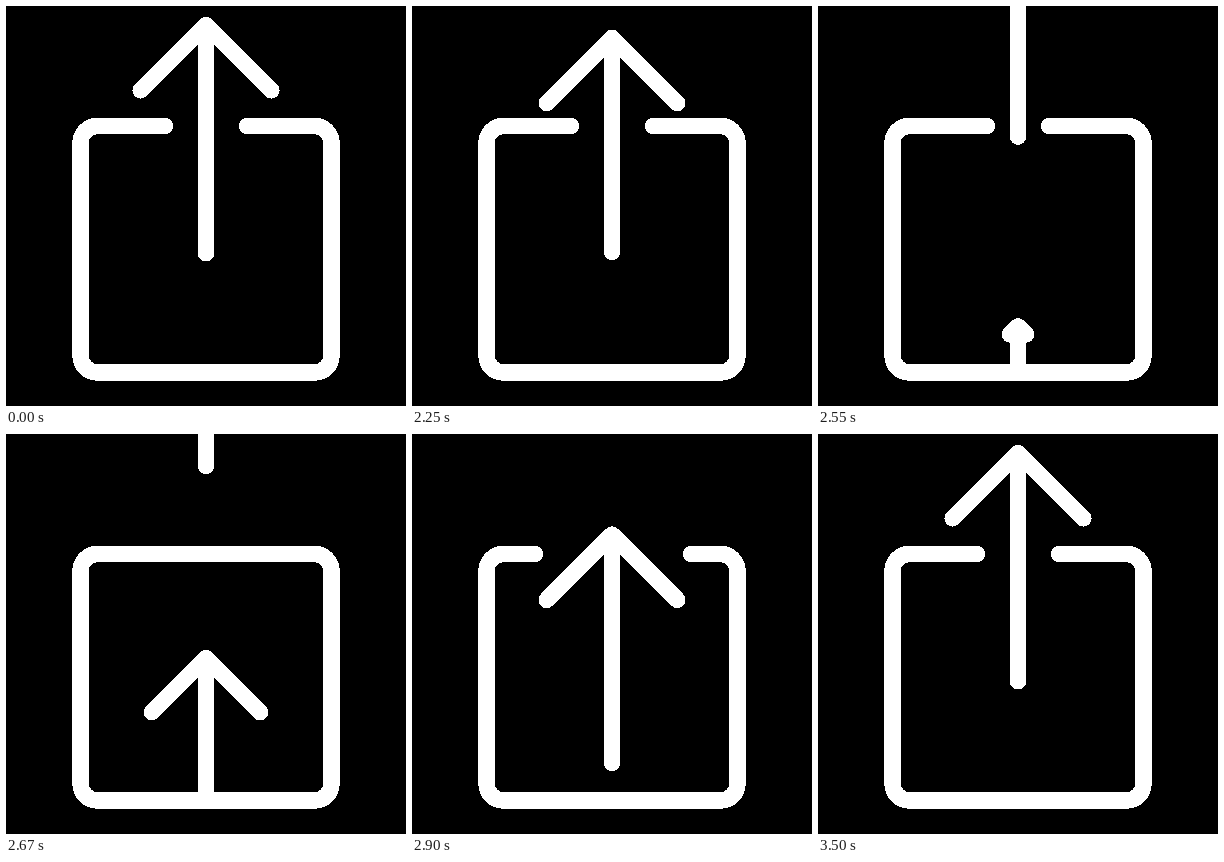
These frames come from a looping animation (400 px wide and 400 px high, 3.52 s). An HTML page:

```html
<!DOCTYPE html>
<html lang="en">
<head>
<meta charset="utf-8">
<title>Share icon</title>
<style>
  html, body { margin: 0; width: 100%; height: 100%; overflow: hidden; background: #000; }
  svg { display: block; width: 100%; height: 100%; shape-rendering: crispEdges; }
  path { fill: none; stroke: #fff; stroke-width: 16.5; stroke-linecap: round; stroke-linejoin: round; }
</style>
</head>
<body>
<svg viewBox="0 0 400 400">
  <clipPath id="aboveFloor"><rect width="400" height="366"/></clipPath>
  <path id="leaving"/>
  <g clip-path="url(#aboveFloor)"><path id="rising"/></g>
  <path id="box"/>
</svg>
<script>
  const LOOP = 3520, TOP = 19, TAIL = 247.2, ARM = 65.3, GAP = 41;
  const WIDE_LEFT = 98, WIDE_RIGHT = 100.5;
  const [leaving, rising, box] = ['leaving', 'rising', 'box'].map(id => document.getElementById(id));

  const progress = (t, from, to) => Math.min(1, Math.max(0, (t - from) / (to - from)));
  const smooth = (t, from, to) => {
    const u = progress(t, from, to);
    return u * u * (3 - 2 * u);
  };

  const arrow = (top, tail, arm) =>
    `M200 ${tail}V${top}M${200 - arm} ${top + arm}L200 ${top}L${200 + arm} ${top + arm}`;

  const frame = (left, right) =>
    `M${200 - left} 120H91.5a17 17 0 0 0-17 17V349.5a17 17 0 0 0 17 17` +
    `H308.5a17 17 0 0 0 17-17V137a17 17 0 0 0-17-17H${200 + right}`;

  function gapAt(t, wide) {
    if (t < 2667) return GAP * (1 - smooth(t, 2500, 2660));
    if (t < 3000) return wide * smooth(t, 2667, 3000);
    return wide + (GAP - wide) * smooth(t, 3000, 3400);
  }

  function render(t) {
    // The head dips before the whole arrow accelerates upwards.
    const squash = 14 * Math.sin(Math.PI * progress(t, 2000, 2480));
    const lift = 0.001045 * Math.max(0, t - 2217) ** 2;
    leaving.setAttribute('d', t < 2720 ? arrow(TOP + squash - lift, TAIL - lift, ARM) : '');

    // The next arrow decelerates out of the floor of the box.
    const u = progress(t, 2500, 3500);
    const drop = u < 1 ? 351 * Math.exp(-u * (2.7 + 2.13 * u)) - 2.8 : 0;
    const arm = ARM * smooth(t, 2500, 2732);
    rising.setAttribute('d', t > 2500 ? arrow(TOP + drop, TAIL + drop, arm) : '');

    box.setAttribute('d', frame(gapAt(t, WIDE_LEFT), gapAt(t, WIDE_RIGHT)));
  }

  const start = performance.now();
  function tick() {
    render((performance.now() - start) % LOOP);
    requestAnimationFrame(tick);
  }
  tick();
</script>
</body>
</html>
```
